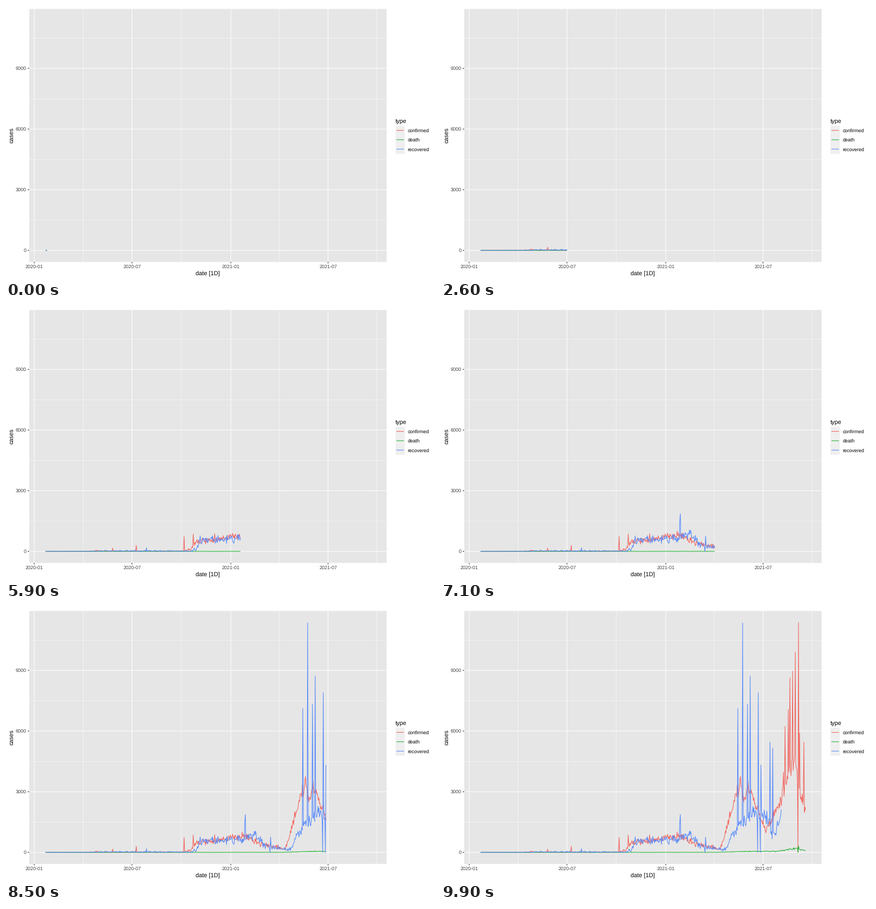
Write a matplotlib script that moves like this. It is 792 px wide and 504 px high and loops after 10000 ms.

```python
import numpy as np
import matplotlib.pyplot as plt
from matplotlib.animation import FuncAnimation
from matplotlib.patches import Rectangle

plt.rcParams.update({
    "font.family": "Liberation Sans",
    "text.hinting": "none",
    "path.simplify": False,
})

W, H, DPI = 792, 504, 72
FRAMES, INTERVAL = 100, 100
LAST_DAY = 605

# Panel edges and data scales, in pixels from the top left
LEFT, RIGHT, TOP, BOTTOM = 42.9, 702.7, 5.5, 472.5
X0, PX_DAY = 72.9, 600 / LAST_DAY
Y0, PX_CASE = 451.2, 112 / 3000

RED, GREEN, BLUE = "#f2635c", "#1fb02f", "#5589fb"
TICK, GREY = "#2b2b2b", "#444444"


def px(day):
    return X0 + np.asarray(day) * PX_DAY


def py(cases):
    return Y0 - np.asarray(cases) * PX_CASE


def series(knots, spikes, spread, seed, last=LAST_DAY):
    """Daily counts: a trend with square-root noise, plus one-day spikes."""
    days = np.arange(last + 1)
    trend = np.interp(days, *zip(*knots))
    noise = np.random.default_rng(seed).normal(0, spread, days.size)
    values = trend + noise.clip(-2 * spread, 2 * spread) * np.sqrt(trend)
    values[list(spikes)] = list(spikes.values())
    return px(days), py(np.maximum(values, 0))


confirmed = series(
    [(0, 0), (80, 2), (94, 40), (104, 12), (255, 12), (270, 100), (280, 450),
     (320, 600), (375, 850), (400, 420), (446, 190), (466, 1900),
     (484, 3500), (490, 2550), (498, 3300), (515, 2100), (531, 1100),
     (558, 2500), (583, 4600), (590, 3700), (595, 2900), (605, 2000)],
    {125: 160, 169: 300, 258: 740, 275: 860, 315: 880, 564: 3970, 567: 6230,
     573: 7080, 576: 8640, 581: 8970, 586: 9910, 591: 0, 592: 11370,
     594: 5900, 602: 5460},
    spread=3.5, seed=4)

death = series(
    [(0, 0), (440, 4), (500, 50), (550, 45), (580, 180), (590, 210),
     (605, 100)],
    {591: 0, 592: 320},
    spread=2, seed=8)

recovered = series(
    [(0, 0), (85, 2), (110, 20), (160, 25), (270, 12), (281, 150),
     (287, 530), (365, 650), (390, 850), (410, 300), (445, 150), (458, 150),
     (470, 1000), (491, 1500), (505, 1900), (525, 2000), (538, 1600),
     (540, 900), (548, 950), (560, 1850)],
    {188: 180, 288: 770, 371: 1500, 372: 1870, 418: 0, 419: 760, 479: 7120,
     488: 11350, 497: 7340, 502: 8730, 516: 0, 517: 7900, 521: 0, 522: 4320,
     539: 5450, 544: 5170},
    spread=4.5, seed=15, last=560)

fig = plt.figure(figsize=(W / DPI, H / DPI), dpi=DPI, facecolor="white")
ax = fig.add_axes([0, 0, 1, 1])
ax.set(xlim=(0, W), ylim=(H, 0))
ax.axis("off")


def box(x, y, w, h, color):
    ax.add_patch(Rectangle((x, y), w, h, fc=color, ec="none", lw=0,
                           snap=False, zorder=0))


def stroke(xs, ys, color, width=1.07, z=1):
    return ax.plot(xs, ys, color=color, lw=width, zorder=z, snap=False,
                   solid_capstyle="butt", solid_joinstyle="round")[0]


def label(x, y, text, size=9, color="black", ha="left", angle=0):
    ax.text(x, y, text, fontsize=size, color=color, ha=ha, va="baseline",
            rotation=angle, rotation_mode="anchor")


# Panel, grid and axes
box(LEFT, TOP, RIGHT - LEFT, BOTTOM - TOP, "#e6e6e6")
ticks = {-21: "2020-01", 161: "2020-07", 345: "2021-01", 526: "2021-07"}
starts = list(ticks)
starts.append(2 * starts[-1] - starts[-2])
for a, b in zip(starts, starts[1:]):
    stroke([px((a + b) / 2)] * 2, [TOP, BOTTOM], "white", .53)
for cases in range(1500, 12000, 3000):
    stroke([LEFT, RIGHT], [py(cases)] * 2, "white", .53)
for cases in range(0, 12000, 3000):
    y = py(cases)
    stroke([LEFT, RIGHT], [y, y], "white")
    stroke([LEFT - 2.75, LEFT], [y, y], TICK)
    label(LEFT - 4.9, y + 3.1, str(cases), color=GREY, ha="right")
for day, name in ticks.items():
    x = px(day)
    stroke([x, x], [TOP, BOTTOM], "white")
    stroke([x, x], [BOTTOM, BOTTOM + 2.75], TICK)
    label(x, 484, name, color=GREY, ha="center")
label((LEFT + RIGHT) / 2, 498, "date [1D]", 11, ha="center")
label(14, (TOP + BOTTOM) / 2 - .4, "cases", 11, ha="center", angle=90)

# Legend
KEY, KEY_X, KEY_Y = 17.28, 719.1, 221
label(KEY_X, 216, "type", 11)
box(KEY_X, KEY_Y, KEY, 3 * KEY, "#efefef")
lines = []
for i, (name, color, data) in enumerate([("confirmed", RED, confirmed),
                                         ("death", GREEN, death),
                                         ("recovered", BLUE, recovered)]):
    y = KEY_Y + (i + .5) * KEY
    stroke([KEY_X + .1 * KEY, KEY_X + .9 * KEY], [y, y], color)
    label(KEY_X + KEY + 5.5, y + 3.3, name)
    lines.append((stroke([], [], color, z=3 + i), data))


def update(frame):
    end = min(LAST_DAY, int((frame + .5) * LAST_DAY / (FRAMES - 1)))
    for line, (xs, ys) in lines:
        line.set_data(xs[:end + 1], ys[:end + 1])
    return [line for line, _ in lines]


anim = FuncAnimation(fig, update, frames=FRAMES, interval=INTERVAL,
                     repeat=True, repeat_delay=0)
plt.show()
```
